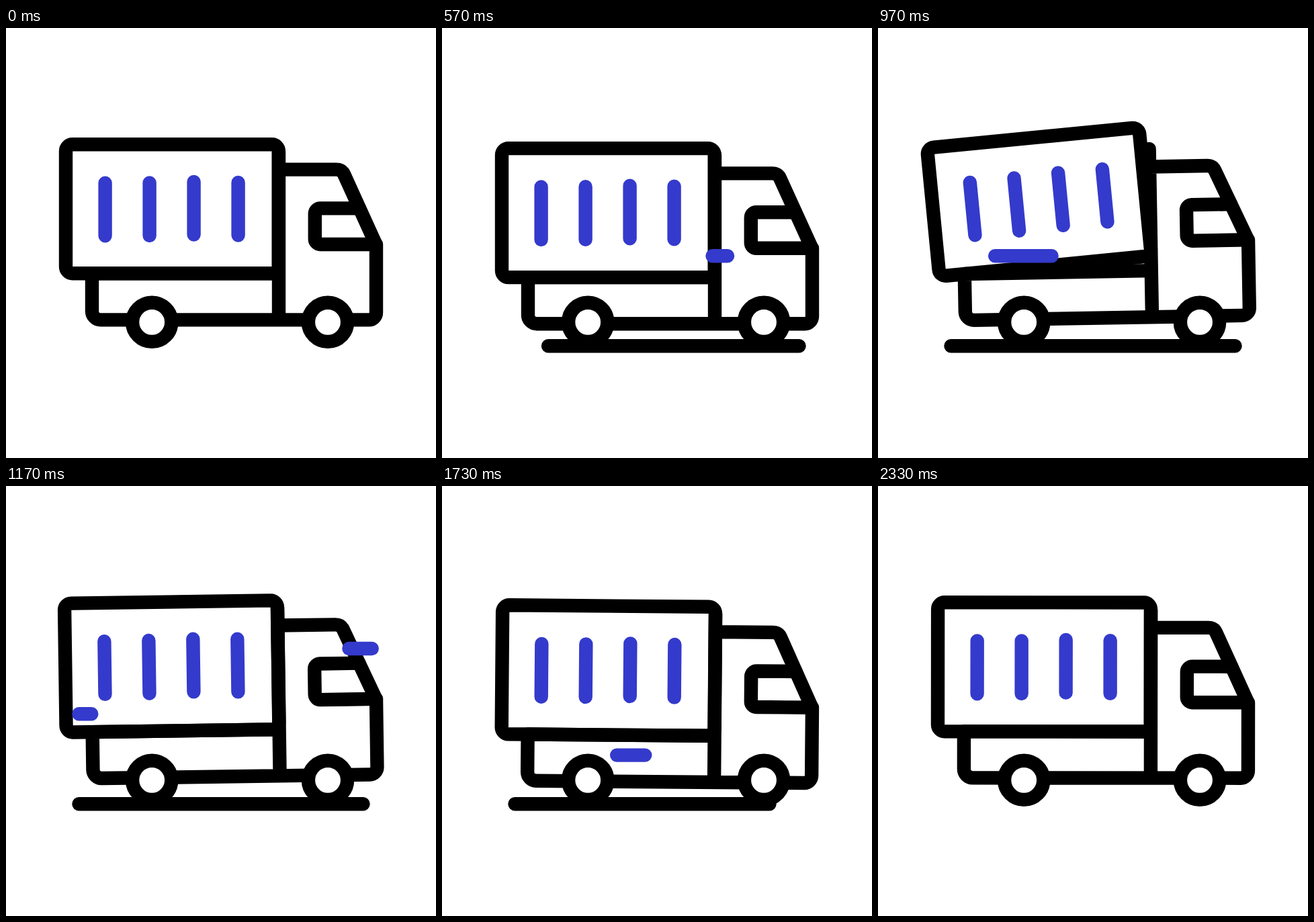
Animation of 640 by 640 pixels, one loop 2500 ms. Source, as an HTML page:

```html
<!DOCTYPE html>
<html lang="en">
<head>
<meta charset="utf-8">
<title>Delivery truck</title>
<style>
  html, body { margin: 0; width: 100%; height: 100%; overflow: hidden; background: #fff; }
  svg { display: block; width: 100%; height: 100%; }
  .ink { fill: none; stroke: #000; stroke-width: 20.4; stroke-linecap: round; stroke-linejoin: round; }
  .blue { stroke: #343acb; }
  .wheel { fill: #fff; }
</style>
</head>
<body>
<svg viewBox="0 0 640 640" class="ink">
  <path id="ground"/>
  <g id="body">
    <path d="M406 184V434.4M406 210.6H491.5C497 210.6 501 213 503 217.5L551 323V423.4a11 11 0 0 1-11 11H141a13 13 0 0 1-13-13V365.3H406"/>
    <path d="M526 268.4H467.8a8 8 0 0 0-8 8V314a8 8 0 0 0 8 8H551"/>
    <g id="box">
      <rect x="89" y="173.3" width="316.8" height="192" rx="10"/>
      <path class="blue" d="M147.6 230.6V309.3M213.6 230.4V309.1M279.6 229V307.6M345.6 230V308.6"/>
    </g>
  </g>
  <circle class="wheel" cx="217.2" cy="437.8" r="29.1"/>
  <circle class="wheel" cx="479" cy="437.8" r="29.1"/>
  <g id="wind" class="blue"></g>
</svg>
<script>
const LOOP = 2500, STEP = 100 / 3;
const $ = id => document.getElementById(id);

// Tracks are [step, value] pairs, eased between neighbours.
const lift = [[1, 0], [17, 5.8], [22, 5.8], [30, -3.4], [42, 0], [52, 6], [58, -3], [64, 2], [71, 0]];
const roll = [[22, 0], [31, -1.15], [42, 0], [46, 0], [58, 0.95], [72, 0]];
const tilt = [[19.2, 0], [26, -8], [32.6, 0]];

// Each streak runs from one x to another; head and tail are step ranges.
const streaks = [
  { y: 242, from: 545, to: 355, head: [30.1, 48.1], tail: [34.6, 51.8] },
  { y: 339.2, from: 425, to: 108, head: [13.4, 35.5], tail: [19.7, 37.7] },
  { y: 400.6, from: 427, to: 210, head: [38.1, 58.3], tail: [41, 61] }
];
const ground = { y: 473.2, from: 531.5, to: 108.5, head: [5.2, 20.2], tail: [49, 64] };

function ease(k, a, b) {
  const t = Math.min(1, Math.max(0, (k - a) / (b - a)));
  return t * t * (3 - 2 * t);
}

function at(track, k) {
  let v = track[0][1];
  for (let i = 1; i < track.length; i++) {
    const [a, va] = track[i - 1], [b, vb] = track[i];
    if (k > a) v = va + (vb - va) * ease(k, a, b);
  }
  return v;
}

function drawLine(el, { y, from, to, head, tail }, k) {
  const x = range => from + (to - from) * ease(k, ...range);
  const visible = k > head[0] && k < tail[1];
  el.setAttribute("d", visible ? `M${x(tail)} ${y}H${x(head)}` : "");
}

for (const s of streaks) {
  s.el = document.createElementNS("http://www.w3.org/2000/svg", "path");
  $("wind").append(s.el);
}

function draw(ms) {
  const k = Math.floor((ms % LOOP + 4) / STEP) % 75;
  $("body").setAttribute("transform", `translate(0 ${at(lift, k)}) rotate(${at(roll, k)} 340 320)`);
  $("box").setAttribute("transform", `rotate(${at(tilt, k)} 128 346)`);
  drawLine($("ground"), ground, k);
  for (const s of streaks) drawLine(s.el, s, k);
}

const start = performance.now();
function tick() {
  draw(performance.now() - start);
  requestAnimationFrame(tick);
}
tick();
</script>
</body>
</html>
```
